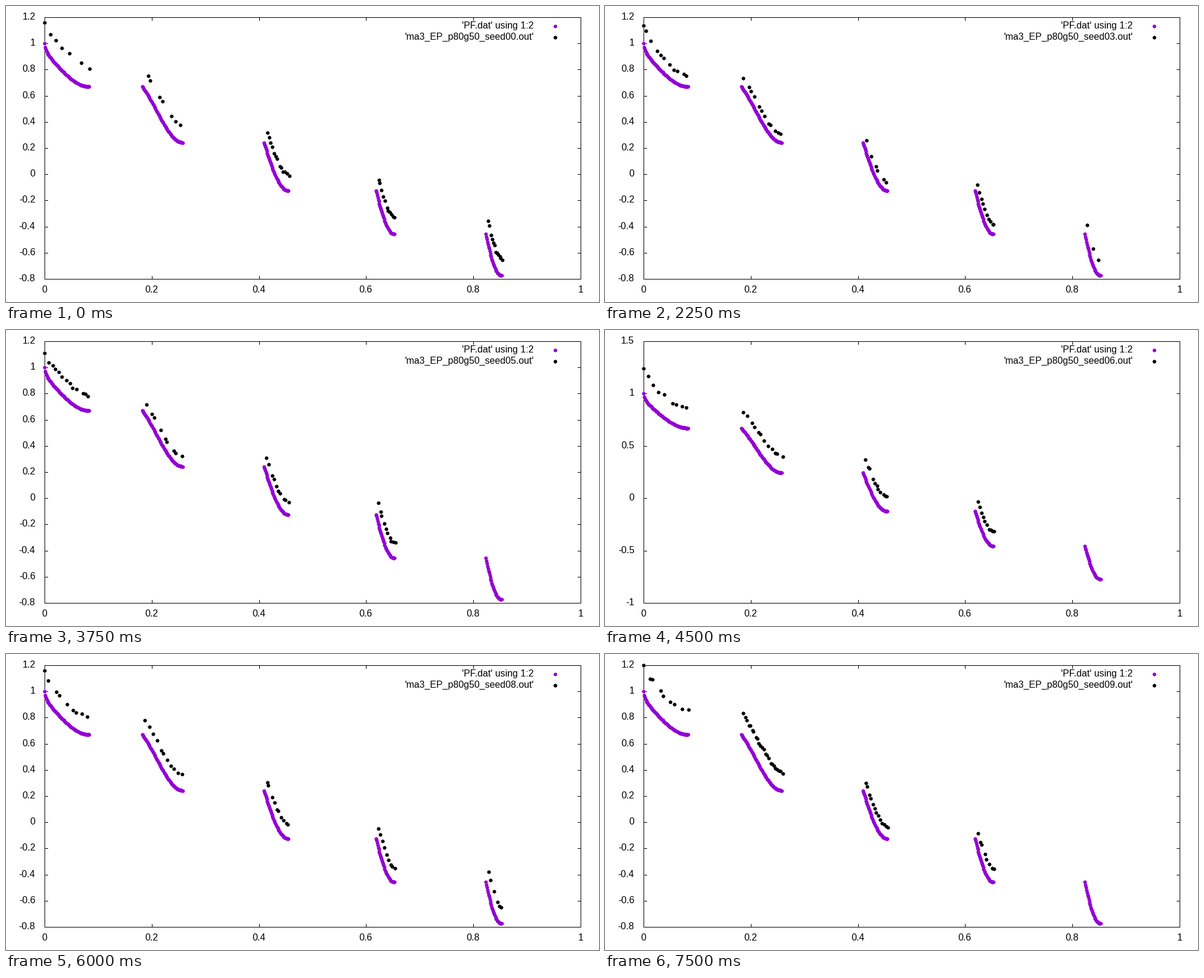
Write a matplotlib script that moves like this. It is 1000 px wide and 500 px high and loops after 8.25 s.

```python
import numpy as np
import matplotlib.pyplot as plt
from matplotlib.animation import FuncAnimation
from matplotlib.collections import PolyCollection

W, H, DPI = 1000, 500, 100
LEFT, RIGHT, TOP, BOTTOM = 65, 969, 19, 461
TICK = 5
PURPLE = "#9400d3"
FONT = dict(family="Liberation Sans", size=16 * 72 / DPI, color="black")

# Axis ranges: (low, high, tick step)
NARROW = (-0.8, 1.2, 0.2)
WIDE = (-1.0, 1.5, 0.5)

# The five pieces of the ZDT3 Pareto front
SEGMENTS = [(0.0, 0.0830015), (0.1822287, 0.2577624), (0.4093137, 0.4538821),
            (0.6183968, 0.6525117), (0.8233318, 0.8518329)]
KNOTS = [0.0] + [(a + b) / 2 for a, b in SEGMENTS]

# Per run: seed name, axis range, points on each piece of the front, and
# height above the front at x = 0 and at the middle of each piece
RUNS = [
    ("00", NARROW, (7, 7, 13, 11, 12), (.16, .16, .13, .12, .12, .12)),
    ("01", NARROW, (9, 17, 12, 5, 12), (.06, .05, .04, .04, .06, .09)),
    ("02", NARROW, (9, 12, 10, 8, 7), (.137, .10, .08, .07, .08, .09)),
    ("03", NARROW, (11, 12, 6, 10, 3), (.137, .09, .06, .06, .07, .10)),
    ("04", WIDE, (9, 13, 11, 9, 6), (.25, .20, .16, .14, .13, .14)),
    ("05", NARROW, (13, 9, 10, 10, 0), (.11, .13, .07, .09, .11, .11)),
    ("06", WIDE, (9, 12, 11, 10, 0), (.24, .19, .16, .14, .13, .13)),
    ("07", WIDE, (10, 15, 14, 22, 0), (.23, .21, .16, .13, .12, .12)),
    ("08", NARROW, (9, 11, 10, 9, 6), (.16, .14, .12, .11, .11, .12)),
    ("099", WIDE, (5, 12, 13, 8, 6), (.32, .28, .22, .18, .14, .20)),
    ("09", NARROW, (9, 24, 13, 8, 0), (.20, .18, .15, .09, .10, .10)),
]

# Seven-pixel dot around the pixel whose corner is (0, 0)
DOT = np.array([(-2, -2), (0, -2), (0, -3), (1, -3), (1, -2), (3, -2), (3, 0),
                (4, 0), (4, 1), (3, 1), (3, 3), (1, 3), (1, 4), (0, 4), (0, 3),
                (-2, 3), (-2, 1), (-3, 1), (-3, 0), (-2, 0)])


def front(x):
    return 1 - np.sqrt(x) - x * np.sin(10 * np.pi * x)


def to_stage(x, y, limits):
    low, high, _ = limits
    px = LEFT + np.asarray(x) * (RIGHT - LEFT)
    py = BOTTOM - (np.asarray(y) - low) / (high - low) * (BOTTOM - TOP)
    return np.rint(np.column_stack([px, py]))


def population(seed, counts, lifts):
    """Points above the front in which no point is beaten by another."""
    rng = np.random.default_rng(seed)
    xs, ys = [0.0], [1 + lifts[0]]
    for (a, b), n in zip(SEGMENTS, counts):
        n -= a == 0  # the first point is already there
        t = (np.arange(n) + rng.uniform(0.1, 0.9, n)) / max(n, 1)
        x = a + t * (b - a)
        lift = np.interp(x, KNOTS, lifts) * rng.uniform(0.9, 1.1, n)
        xs.extend(x + 0.003)
        ys.extend(front(x) + lift)
    return np.array(xs), np.sort(ys)[::-1]


def dots(points):
    return np.asarray(points)[:, None, :] + DOT


def bar(x0, y0, x1, y1):
    """Filled box covering the pixels x0..x1 and y0..y1."""
    return [(x0, y0), (x1 + 1, y0), (x1 + 1, y1 + 1), (x0, y1 + 1)]


front_x = np.concatenate([np.arange(a, b + 0.0005, 0.001) for a, b in SEGMENTS])
front_y = front(front_x)

fig = plt.figure(figsize=(W / DPI, H / DPI), dpi=DPI, facecolor="white")
ax = fig.add_axes([0, 0, 1, 1])
ax.set_xlim(0, W)
ax.set_ylim(H, 0)
ax.axis("off")


def shapes(color, z):
    c = PolyCollection([], facecolors=color, edgecolors="none", linewidths=0,
                       zorder=z)
    c.set_snap(False)
    ax.add_collection(c, autolim=False)
    return c


def label(x, y, text="", ha="right"):
    return ax.text(x, y, text, ha=ha, va="baseline", **FONT)


axis_bars = shapes("black", 1)
front_dots = shapes(PURPLE, 2)
run_dots = shapes("black", 3)

# Key
KEY_FRONT, KEY_RUN = (926, 34), (926, 53)
label(890.2, 38, "'PF.dat' using 1:2")
title = label(890.2, 57)

# Frame and x axis, the same all the time
fixed_bars = [bar(LEFT, TOP, RIGHT, TOP), bar(LEFT, BOTTOM, RIGHT, BOTTOM),
              bar(LEFT, TOP, LEFT, BOTTOM), bar(RIGHT, TOP, RIGHT, BOTTOM)]
for k in range(6):
    col = round(LEFT + k * (RIGHT - LEFT) / 5)
    fixed_bars += [bar(col, TOP, col, TOP + TICK),
                   bar(col, BOTTOM - TICK, col, BOTTOM)]
    label(col - 0.2, 484, f"{k / 5:g}", ha="center")

y_labels = [label(49.5, 0) for _ in range(11)]


def update(i):
    name, limits, counts, lifts = RUNS[i]
    low, high, step = limits
    points = to_stage(*population(i, counts, lifts), limits)
    front_dots.set_verts(dots(np.vstack([to_stage(front_x, front_y, limits),
                                         KEY_FRONT])))
    run_dots.set_verts(dots(np.vstack([points, KEY_RUN])))
    title.set_text(f"'ma3_EP_p80g50_seed{name}.out'")

    count = round((high - low) / step) + 1
    bars = list(fixed_bars)
    for k, text in enumerate(y_labels):
        if k >= count:
            text.set_text("")
            continue
        row = round(BOTTOM - k * (BOTTOM - TOP) / (count - 1))
        bars += [bar(LEFT, row, LEFT + TICK, row),
                 bar(RIGHT - TICK, row, RIGHT, row)]
        text.set_text(f"{round(low + k * step, 1) + 0.0:g}")
        text.set_y(row + 4)
    axis_bars.set_verts(bars)
    return [axis_bars, front_dots, run_dots, title, *y_labels]


anim = FuncAnimation(fig, update, frames=len(RUNS), interval=750,
                     repeat=True, repeat_delay=0, blit=False)
plt.show()
```
